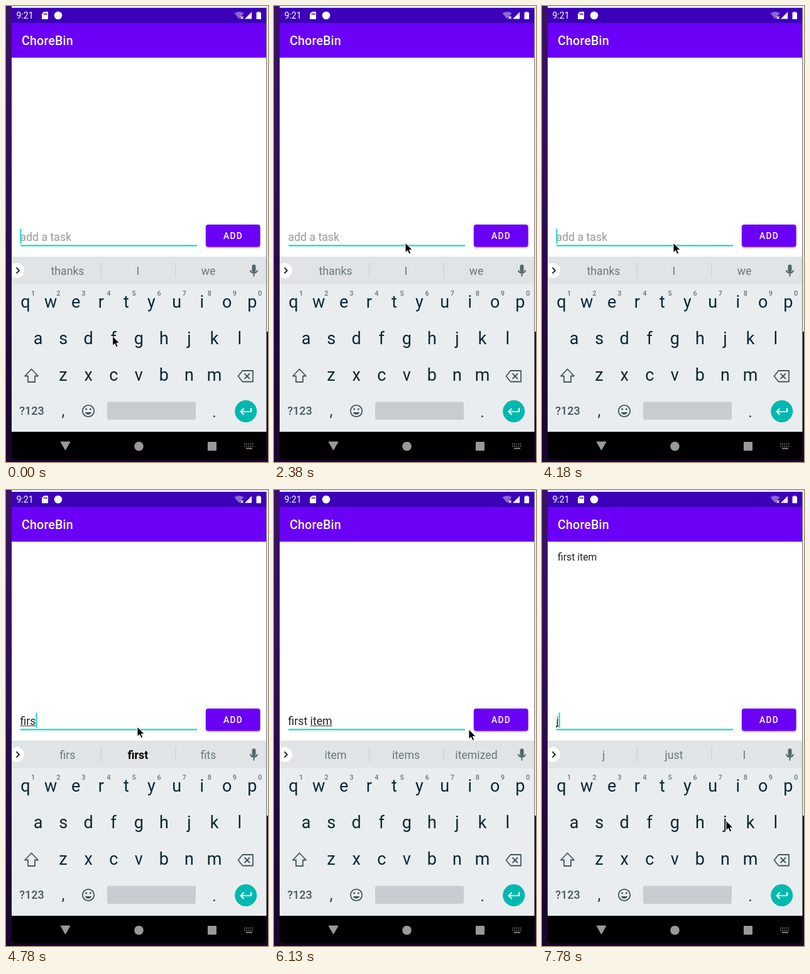
Animation of 417x724 px, one loop 8 s. Source, as an HTML page:

```html
<!DOCTYPE html>
<html lang="en">
<head>
<meta charset="utf-8">
<style>
  html, body { margin: 0; width: 100%; height: 100%; overflow: hidden; background: #210638; }
  svg { display: block; width: 417px; height: 724px; font-family: Roboto, sans-serif; }
  text { white-space: pre; }
  .mid text { text-anchor: middle; }
  .line { fill: none; stroke: #46565d; stroke-width: 1.8; }
</style>
</head>
<body>
<svg viewBox="0 0 417 724">
  <defs>
    <linearGradient id="desk" x2="0" y2="1">
      <stop stop-color="#3b1263"/><stop offset=".3" stop-color="#32105a"/>
      <stop offset=".7" stop-color="#260642"/><stop offset="1" stop-color="#18042d"/>
    </linearGradient>
    <filter id="shade" x="-10%" y="-20%" width="120%" height="150%">
      <feDropShadow dx="0" dy="1.3" stdDeviation="1.1" flood-opacity=".35"/>
    </filter>
    <clipPath id="screen"><path d="M9 3H414V724H9Z"/></clipPath>
  </defs>

  <path fill="url(#desk)" d="M0 0H417V724H0Z"/>
  <path fill="#e5e8ef" d="M9 0H417V3H9ZM414 0H417V517H414Z"/>
  <path fill="#777" d="M414 3H415V676H414Z"/>

  <!-- App -->
  <path fill="#fff" d="M9 81H414V398H9Z"/>
  <path fill="#3c00b8" d="M9 3H414V27H9Z"/>
  <path fill="#6a00f6" d="M9 27H414V82H9Z"/>
  <g fill="#fff">
    <text x="16.500" y="20" font-size="14">9:21</text>
    <path d="M60.500 9H66Q67 9 67 10V20Q67 21 66 21H58Q57 21 57 20V12.500Z"/>
    <path fill="#3c00b8" d="M60 11.500H61.300V14H60ZM62.200 11.500H63.500V14H62.200ZM64.300 11.500H65.600V14H64.300Z"/>
    <circle cx="83" cy="15" r="6.300"/>
    <path opacity=".4" d="M363.500 11.500Q371 6.500 378.500 11.500L371 20.500Z"/>
    <path d="M391 9.500V20.500H380Z"/>
    <path d="M400.500 9H403.500V10.200H406V21H398.500V10.200H400.500Z"/>
    <path d="M373.500 16.500L377.500 20.500M377.500 16.500L373.500 20.500" stroke="#fff" stroke-width="1.200"/>
    <text x="25" y="62" font-size="19.700" font-weight="500" letter-spacing=".15">ChoreBin</text>
  </g>
  <text id="item" x="25" y="111.500" font-size="15.760" fill="#222">first item</text>

  <path fill="#0bdcca" d="M23 379.300H304V381.500H23Z"/>
  <text id="hint" x="22.500" y="372.500" font-size="17.700" fill="#999">add a task</text>
  <text id="entry" x="22.500" y="372.500" font-size="17.700" fill="#222"></text>
  <path id="underline" stroke="#333" stroke-width="1"/>
  <rect id="caret" y="353.500" width="2" height="24" fill="#0bdcca"/>

  <rect x="318" y="347" width="86.500" height="35.500" rx="4" fill="#6a00f6" filter="url(#shade)"/>
  <text x="346" y="370" font-size="13.800" font-weight="500" letter-spacing="1.230" fill="#fff">ADD</text>

  <!-- Keyboard -->
  <path fill="#e9edf0" d="M9 398H414V676H9Z"/>
  <path fill="#e0e4e6" d="M9 398H414V441.500H9Z"/>
  <g clip-path="url(#screen)"><circle cx="17" cy="420" r="12" fill="#fff"/></g>
  <path class="line" stroke-width="2" style="stroke:#222" d="M16.500 415.500L21 420L16.500 424.500"/>
  <path stroke="#c6cbce" d="M151.500 408V431.500M270 408V431.500"/>
  <g id="words" class="mid" font-size="17.700"></g>
  <rect x="391.500" y="410.500" width="6" height="12.500" rx="3" fill="#55656c"/>
  <path class="line" d="M388.800 419.500A5.900 5.900 0 0 0 400.200 419.500M394.500 425V429.500"/>

  <g id="keys" class="mid" font-size="27" fill="#0c2732"></g>
  <path class="line" stroke-linejoin="round" d="M40.500 576.500L51 587.500H46V597H35V587.500H30Z"/>
  <path class="line" stroke-linejoin="round" d="M376.500 579H393V596.500H376.500L369.500 587.800ZM379.500 583.500L388 592M388 583.500L379.500 592"/>
  <g class="mid" fill="#46565d">
    <text x="41" y="649" font-size="18" font-weight="500">?123</text>
    <text x="91" y="651" font-size="25" fill="#263b44">,</text>
    <text x="331.500" y="653" font-size="25" fill="#263b44">.</text>
  </g>
  <circle class="line" cx="131" cy="643" r="9.200"/>
  <path fill="#46565d" d="M125.800 645H136.200A5.500 5.500 0 0 1 125.800 645Z"/>
  <circle cx="127.700" cy="640" r="1.500" fill="#46565d"/>
  <circle cx="134.300" cy="640" r="1.500" fill="#46565d"/>
  <rect x="161" y="628.500" width="141" height="28.500" rx="3" fill="#c8ccd0"/>
  <circle cx="381.700" cy="643.500" r="17.500" fill="#00b9ae"/>
  <path class="line" style="stroke:#fff;stroke-width:2" d="M390 638.500V644H374M378.500 639L373.500 644L378.500 649"/>

  <!-- Navigation bar -->
  <path fill="#000" d="M9 676H414V712Q414 720 406 720H17Q9 720 9 712Z"/>
  <g fill="#999">
    <path stroke="#999" stroke-linejoin="round" d="M87 692H102L94.500 705Z"/>
    <circle cx="211.500" cy="699" r="7.300"/>
    <rect x="321" y="692" width="14" height="14" rx="1"/>
    <path stroke="#888" stroke-width="1.700" stroke-dasharray="1.700 1.500" d="M379 695.500H395M379 699H395"/>
    <path fill="#888" d="M382 701.500H392V703.500H382Z"/>
  </g>

  <path id="pointer" stroke="#fff" stroke-width="1" stroke-linejoin="round" d="M0 0V15.500L3.600 12.200L6 17.800L8.700 16.600L6.300 11.200H11.200Z"/>
</svg>
<script>
const LOOP = 8000, TICK = 150;
const $ = id => document.getElementById(id);

function addText(parent, x, y, content, attrs = {}) {
  const node = document.createElementNS('http://www.w3.org/2000/svg', 'text');
  for (const [name, value] of Object.entries({ x, y, ...attrs })) node.setAttribute(name, value);
  node.textContent = content;
  return parent.appendChild(node);
}

[['qwertyuiop', 31, 479], ['asdfghjkl', 51, 537], ['zxcvbnm', 91, 595]].forEach(([row, x, y]) =>
  [...row].forEach((key, i) => addText($('keys'), x + 40.1 * i, y, key)));
[...'1234567890'].forEach((digit, i) =>
  addText($('keys'), 43.2 + 40.1 * i, 459.5, digit, { 'font-size': 11, 'font-weight': 500, fill: '#66757b' }));
const words = [98, 210, 322].map(x => addText($('words'), x, 426.5, ''));

// Start time, entered text, suggestions, caret shown
const IDLE = 'thanks I we';
const typing = [
  [0, '', IDLE, 1], [450, '', IDLE, 0], [900, '', IDLE, 1], [1480, '', IDLE, 0],
  [1930, '', IDLE, 1], [2380, '', IDLE, 0],
  [2980, 't', 't the to', 1], [3130, 'th', 'th the that', 1],
  [3280, 'thi', 'thi this think', 1], [3430, 'this', "this thus this'll", 1],
  [3880, 'thi', 'thi this think', 1], [4030, 't', 't the to', 1], [4180, '', IDLE, 1],
  [4330, 'f', 'f for from', 1], [4480, 'fi', 'fi first find', 1],
  [4630, 'fir', 'fir for first', 1], [4780, 'firs', 'firs first fits', 1],
  [5080, 'first', 'first firstly firsts', 1], [5230, 'first ', 'of time I', 1],
  [5380, 'first i', 'i I is', 1], [5530, 'first ite', 'ite item items', 1],
  [5680, 'first item', 'item items itemized', 1], [6130, 'first item', 'item items itemized', 0],
  [6430, '', IDLE, 1], [7030, '', IDLE, 0], [7480, '', IDLE, 1], [7780, 'j', 'j just I', 1]
];

// Time, x, y of the pointer tip
const path = [
  [0, 169.5, 524], [300, 169.5, 524], [1330, 99.5, 520], [1480, 108, 530], [1930, 195, 465],
  [2230, 217, 392], [2380, 209, 376], [5830, 209, 376], [6130, 310, 380], [6280, 348, 370],
  [6580, 350, 370], [6880, 321, 448], [7030, 316, 470], [7480, 293, 525], [LOOP, 293, 525]
];

function pointerAt(t) {
  const i = path.findIndex(p => p[0] > t);
  const [t0, x0, y0] = path[i - 1], [t1, x1, y1] = path[i];
  const k = (t - t0) / (t1 - t0);
  return [x0 + (x1 - x0) * k, y0 + (y1 - y0) * k];
}

function render(time) {
  const now = time % LOOP, base = now < 1330 ? 0 : 1330;
  const t = base + Math.floor((now - base) / TICK) * TICK;
  const [, value, suggestions, caretOn] = typing.findLast(s => s[0] <= t);

  $('entry').textContent = value;
  $('hint').style.display = value ? 'none' : '';
  $('item').style.display = t >= 6430 ? '' : 'none';

  const width = text => text ? $('entry').getSubStringLength(0, text.length) : 0;
  const end = 22.5 + width(value);
  const start = 22.5 + width(value.slice(0, value.lastIndexOf(' ') + 1));
  $('underline').setAttribute('d', `M${start} 374.500H${end}`);
  $('caret').setAttribute('x', end);
  $('caret').style.display = caretOn ? '' : 'none';

  suggestions.split(' ').forEach((word, i) => {
    const strong = value === 'firs' && i === 1;
    words[i].textContent = word;
    words[i].setAttribute('font-weight', strong ? 700 : 400);
    words[i].setAttribute('fill', strong ? '#000' : '#68767c');
  });
  $('pointer').setAttribute('transform', `translate(${pointerAt(t)})`);
}

function loop() {
  render(performance.now());
  requestAnimationFrame(loop);
}
loop();
</script>
</body>
</html>
```
